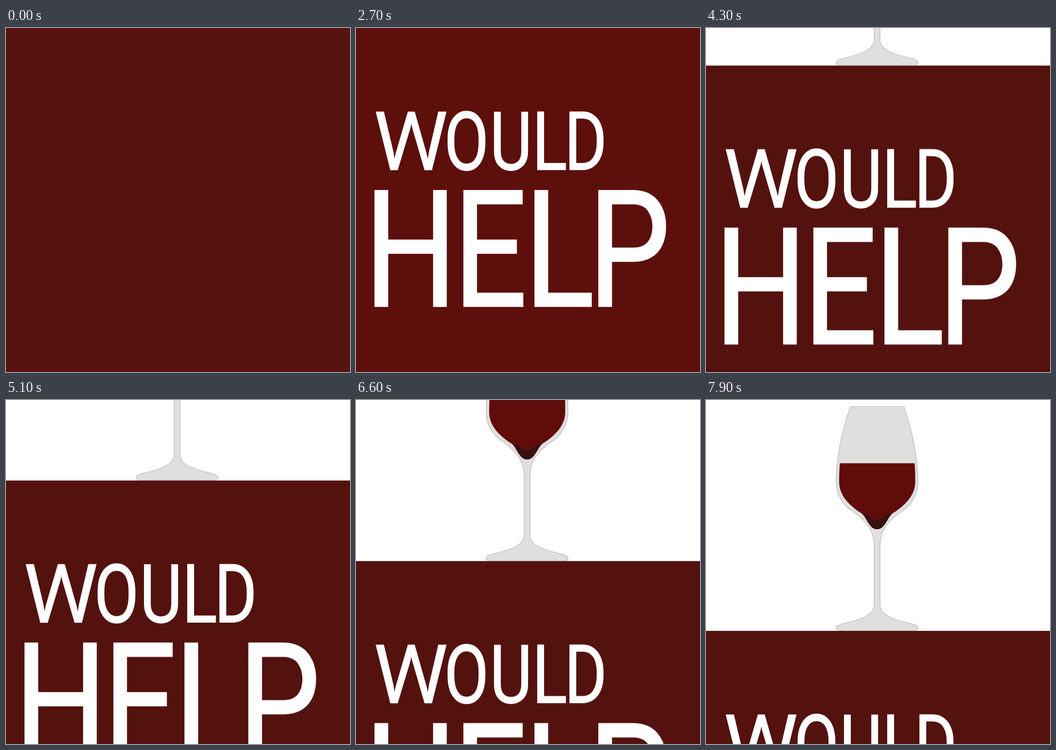
Write an HTML page without scripts that moves like this. It is 748x748 px and loops after 8000 ms.

```html
<!DOCTYPE html>
<html lang="en">
<head>
<meta charset="utf-8">
<title>A glass would help</title>
<style>
  html, body { margin: 0; width: 100%; height: 100%; overflow: hidden; background: #fff; }
  svg { display: block; width: 100vw; height: 100vh; }

  text {
    font: 400 176px Roboto, sans-serif;
    font-kerning: none;
    fill: #fff;
    stroke: #fff;
    stroke-width: 2;
  }
  .wide { font-size: 178px; stroke-width: .6; }

  .scene { animation: sink 8s infinite; }
  .panel { animation: tone 8s step-end infinite; }
  .first { animation: first 8s step-end infinite; }
  .second { animation: second 8s step-end infinite; }
  .word { opacity: 0; animation: word 8s var(--at) step-end infinite; }

  /* the panel slides down in ten moves a second */
  @keyframes sink {
    0% { transform: translateY(0); }
    45% { transform: translateY(0); animation-timing-function: steps(43); }
    98.75%, 100% { transform: translateY(502px); }
  }
  @keyframes tone {
    0% { fill: #58120f; }
    6.25% { fill: #5d0f0c; }
    46.25%, 100% { fill: #54120f; }
  }
  @keyframes first { 0% { opacity: 1; } 30%, 100% { opacity: 0; } }
  @keyframes second { 0% { opacity: 0; } 30%, 100% { opacity: 1; } }
  @keyframes word { 0% { opacity: 1; } 70%, 100% { opacity: 0; } }
</style>
</head>
<body>
<svg viewBox="0 0 748 748">
  <g class="scene">
    <g transform="translate(0 -502)">
      <path fill="#dfe0de" stroke="#b5b6b5" stroke-width="1.2" d="
        M314 14H430.5C448 65 461 125 461 178
        C461 205 447 227 429 240C405 257 378.5 275 378.5 318V446
        C378.5 472 422 480 452 488C459 490 461 492 461 495C461 499 458 501 454 501
        H290C286 501 283 499 283 495C283 492 285 490 292 488
        C322 480 365.5 472 365.5 446V318
        C365.5 275 339 257 315 240C297 227 283 205 283 178
        C283 125 296 65 314 14Z"/>
      <path fill="#600c0b" d="
        M291 137.5H453.5C455 150 455 165 455 178
        C455 208 432 230 405 247C394 256 389 281 372 281
        C355 281 350 256 339 247C312 230 289.5 208 289.5 178
        C289.5 165 290 150 291 137.5Z"/>
      <path fill="#35110f" d="
        M339 247C348 250 352 249 357 254C362 260 367 261 372 261
        C377 261 382 260 387 254C392 249 396 250 405 247
        C394 256 389 281 372 281C355 281 350 256 339 247Z"/>
    </g>

    <rect class="panel" width="748" height="760"/>

    <g class="first">
      <g class="word" style="--at:.5s">
        <text transform="scale(.8 1)" x="39 192.4 307.4 425.3 534" y="200">MAYBE</text>
      </g>
      <g class="word" style="--at:.8s">
        <text transform="scale(.8 1)" x="51.1" y="371">A</text>
      </g>
      <g class="word" style="--at:1.1s">
        <text transform="scale(.8 1)" x="263.1 377.8 472.4 585.4 687.9" y="371">GLASS</text>
      </g>
      <g class="word" style="--at:1.5s">
        <text transform="scale(.8 1)" x="42.1 170.3" y="543.5">OF</text>
      </g>
      <g class="word" style="--at:1.7s">
        <text class="wide" transform="scale(1.03 1)" x="297.2" y="544.2">W</text>
        <text transform="scale(.8 1)" x="582.8 626.5 745.3" y="543.5">INE</text>
      </g>
    </g>

    <g class="second">
      <g class="word" style="--at:2.4s">
        <text class="wide" transform="scale(1.03 1)" x="36.7" y="308.7">W</text>
        <text transform="scale(.8 1)" x="239.6 364.1 479 566.6" y="308">OULD</text>
      </g>
      <g class="word" style="--at:2.7s">
        <text transform="scale(1.6 2)" x="11.6 132.4 229 315.8" y="302.3">HELP</text>
      </g>
    </g>
  </g>
</svg>
</body>
</html>
```
